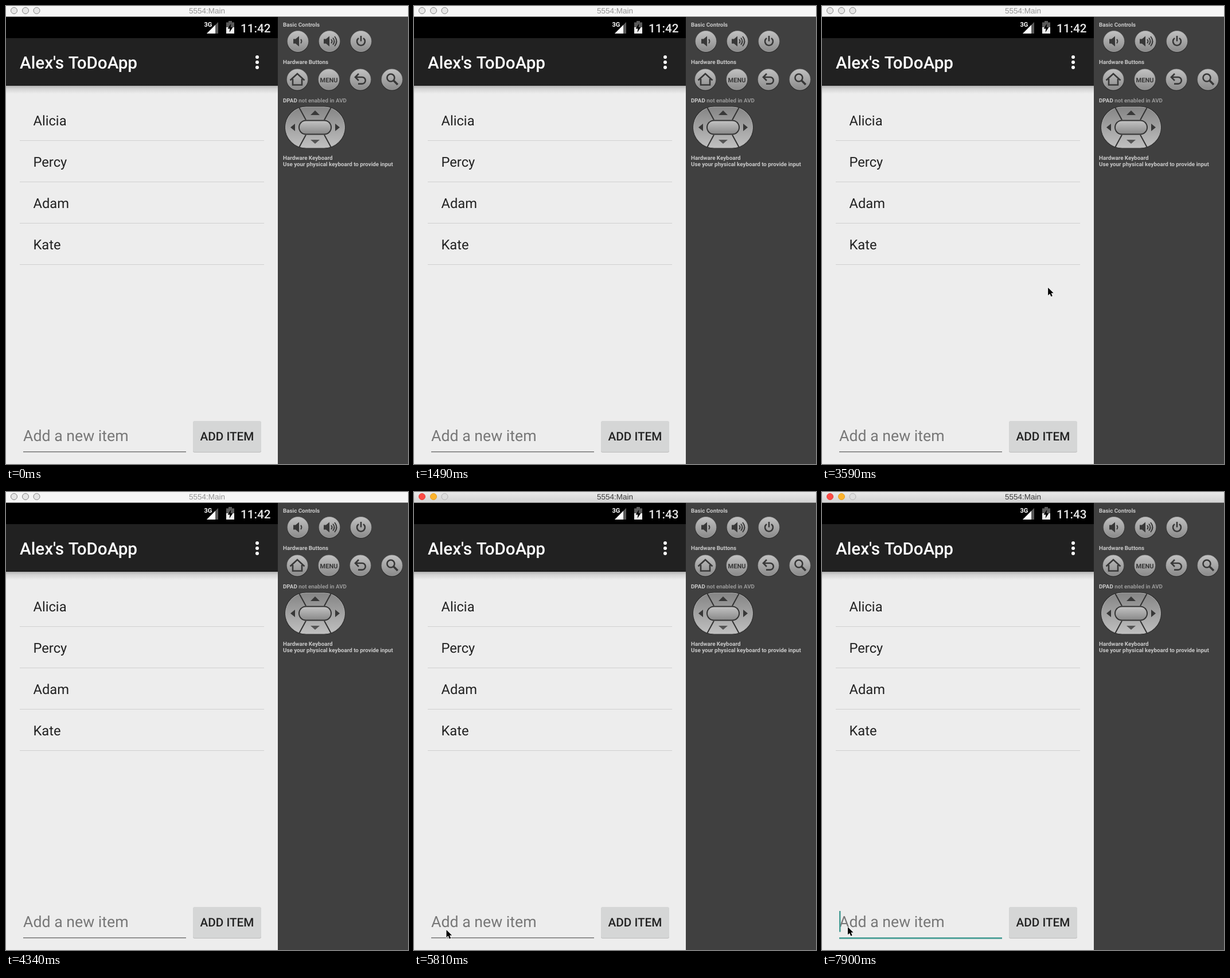
These frames come from a looping animation (701x798 px, 8000 ms). An HTML page:

```html
<!DOCTYPE html>
<html lang="en">
<head>
<meta charset="utf-8">
<title>To-do list in an emulator</title>
<style>
  html, body { margin: 0; width: 100%; height: 100%; overflow: hidden; background: #404040; }
  svg { display: block; width: 100vw; height: 100vh; font-family: Roboto, sans-serif; text-rendering: geometricPrecision; }
  .bar { fill: #f6f6f6; }
  .active .bar { fill: url(#barFill); }
  .name { font: 13.5px "Liberation Sans", sans-serif; fill: #949494; }
  .active .name { fill: #3c3c3c; }
  .light { fill: #e6e6e6; stroke: #858585; }
  .active .light { fill: #dedede; stroke: #b4b4b4; }
  .active .close { fill: #fc4a45; stroke: #e2403b; }
  .active .mini { fill: #fdb32c; stroke: #e09e25; }
  .heading { font-size: 29.6px; font-weight: 500; }
  .item { font-size: 23.7px; fill: #212121; }
  .panel { font-size: 9.8px; font-weight: 700; fill: #c9c9c9; }
  .icon { fill: none; stroke: #383838; stroke-width: 2.6; }
  .solid { fill: #383838; }
</style>
</head>
<body>
<svg id="stage" viewBox="0 0 701 798">
  <defs>
    <linearGradient id="barFill" x2="0" y2="1"><stop stop-color="#eaeaea"/><stop offset="1" stop-color="#d3d3d3"/></linearGradient>
    <linearGradient id="shade" x2="0" y2="1"><stop stop-color="#b2b2b2"/><stop offset=".35" stop-color="#d3d3d3"/><stop offset="1" stop-color="#ededed"/></linearGradient>
    <linearGradient id="metal" x2="0" y2="1"><stop stop-color="#c2c2c2"/><stop offset="1" stop-color="#8a8a8a"/></linearGradient>
    <linearGradient id="pad" x2="0" y2="1"><stop stop-color="#858585"/><stop offset="1" stop-color="#c0c0c0"/></linearGradient>
    <g id="disc">
      <circle cy="1" r="19" fill="#333"/>
      <circle r="18" fill="url(#metal)" stroke="#a8a8a8" stroke-width=".8"/>
    </g>
    <path id="speaker" class="solid" d="M-8-4h4l6-5v18l-6-5h-4z"/>
  </defs>

  <rect width="701" height="798" fill="#404040"/>
  <rect class="bar" width="701" height="18"/>
  <rect y="18" width="701" height="1" fill="#9a9a9a"/>
  <circle class="light close" cx="14" cy="8" r="5.5"/>
  <circle class="light mini" cx="34" cy="8" r="5.5"/>
  <circle class="light" cx="53.5" cy="8" r="5.5"/>
  <text class="name" x="350.5" y="13" text-anchor="middle">5554:Main</text>

  <rect y="19" width="474" height="779" fill="#ededed"/>
  <rect y="139" width="474" height="14" fill="url(#shade)"/>
  <rect y="19" width="474" height="37"/>
  <rect y="56" width="474" height="83" fill="#212121"/>

  <g fill="#fff">
    <text x="345.5" y="35.5" font-size="11" font-weight="700">3G</text>
    <path d="M350 48L370 28V48z" fill="#5a5a5a"/>
    <path d="M350 48L365 33V48z"/>
    <path d="M384 28.5h4V26h6v2.5h4V37h-14z" fill="#5a5a5a"/>
    <path d="M384 37h14V48h-14z" fill="#eee"/>
    <path d="M392.5 30.5l-6 9h4l-1 6.5 6-9h-4z" fill="#000"/>
    <text id="clock" x="409" y="45.5" font-size="20.7" font-weight="500" fill="#e8e8e8"></text>
    <text class="heading" x="24" y="108.5">Alex's</text>
    <text class="heading" x="229" y="108.5" text-anchor="end">ToDoApp</text>
    <circle cx="438" cy="89" r="3"/><circle cx="438" cy="98" r="3"/><circle cx="438" cy="107" r="3"/>
  </g>

  <g id="list"></g>

  <text x="30" y="758" font-size="26.7" fill="#777">Add a new item</text>
  <rect id="line" x="30" y="776" width="284"/>
  <rect id="caret" x="30" y="730" width="2.5" height="36.5" fill="#459c94"/>
  <rect x="326" y="724" width="119" height="54" rx="3" fill="#bcbcbc"/>
  <rect x="326" y="723" width="119" height="54" rx="3" fill="#d5d6d6"/>
  <text x="385.5" y="757" font-size="20.7" font-weight="500" fill="#212121" text-anchor="middle">ADD ITEM</text>

  <g class="panel">
    <text x="483" y="36">Basic Controls</text>
    <text x="483" y="100.5">Hardware Buttons</text>
    <text x="483" y="167.5">DPAD <tspan fill="#999">not enabled in AVD</tspan></text>
    <text x="483" y="267.5">Hardware Keyboard</text>
    <text x="483" y="278.5">Use your physical keyboard to provide input</text>
  </g>

  <g transform="translate(509 61.5)"><use href="#disc"/><use href="#speaker"/><path class="icon" d="M5-3.5q3 3.5 0 7" style="stroke-width:2"/></g>
  <g transform="translate(564 61.5)"><use href="#disc"/><use href="#speaker" x="-2"/><path class="icon" d="M3-3.5q3 3.5 0 7M6-6q5 6 0 12M9-8.5q7 8.5 0 17" style="stroke-width:1.9"/></g>
  <g transform="translate(619 61.5)"><use href="#disc"/><path class="icon" d="M-4-5.5a7 7 0 1 0 8 0M0-9.5V0"/></g>
  <g transform="translate(508 128)"><use href="#disc"/><path class="icon" d="M-12.5 1.5L0-10L12.5 1.5M-8-1V9.500h16V-1"/></g>
  <g transform="translate(563 128)"><use href="#disc"/><text class="solid" y="5" font-size="11" font-weight="700" text-anchor="middle">MENU</text></g>
  <g transform="translate(618 128)"><use href="#disc"/><path class="icon" d="M-7-4H3a5.8 5.8 0 0 1 0 11.6H-4M-3-10L-9-4L-3 2"/></g>
  <g transform="translate(673 128)"><use href="#disc"/><circle class="icon" cx="-2" cy="-3" r="6.5"/><path class="icon" d="M3 2L10 9" style="stroke-width:3.5"/></g>

  <g transform="translate(539 211.5)">
    <rect x="-53" y="-37" width="106" height="74" rx="37" fill="#2c2c2c"/>
    <rect x="-51.5" y="-35.5" width="103" height="71" rx="35.5" fill="url(#pad)" stroke="#b2b2b2"/>
    <path d="M-28-35L-16-13M28-35L16-13M-28 35L-16 13M28 35L16 13" stroke="#333" stroke-width="2"/>
    <rect x="-29" y="-13" width="58" height="26" rx="13" fill="#333"/>
    <rect x="-27" y="-11" width="54" height="22" rx="11" fill="url(#metal)"/>
    <path class="solid" d="M-8-21.5L0-29.5L8-21.5z"/>
    <path d="M-8 21.5L0 28.5L8 21.5z" fill="#555"/>
    <path class="solid" d="M-35-6.5V6.5L-43 0zM35-6.5V6.5L43 0z"/>
  </g>

  <g id="pointer">
    <circle id="ring" cx="1" cy="-2" r="9.5" fill="none" stroke="#111" stroke-width="1.2"/>
    <path d="M0 0V13.3L3.1 10.4L5.3 15.5L7.7 14.4L5.5 9.5H9.6z" stroke="#fff" stroke-width="1.2" paint-order="stroke"/>
  </g>
</svg>
<script>
const $ = id => document.getElementById(id);
const LOOP = 8000, TICK = 147;

$('list').innerHTML = ['Alicia', 'Percy', 'Adam', 'Kate'].map((name, i) =>
  `<text class="item" x="47.5" y="${207.5 + 72 * i}">${name}</text>
   <rect x="24" y="${234 + 72 * i}" width="426" height="1" fill="#d0d0d0"/>`).join('');

// Pointer strokes: visible time, ticks taken, first tick, then a quadratic curve.
const strokes = [
  { from: 750, to: 1490, ticks: 4, first: 0, x: [74, 166, 306], y: [254, 115, -5] },
  { from: 2840, to: 2990, ticks: 1, first: 0, x: [204.5, 204.5, 204.5], y: [-5.5, -5.5, -5.5] },
  { from: 2990, to: 3290, ticks: 1, first: 0, x: [234, 234, 234], y: [286, 286, 286] },
  { from: 3290, to: 4340, ticks: 7, first: 1, x: [234, 441, 554], y: [286, 525, 764] },
  { from: 5210, to: LOOP, ticks: 5, first: -1, x: [72, 60, 45], y: [750, 771, 758] },
];

const within = (t, a, b) => t >= a && t < b;
const curve = ([a, b, c], u) => (1 - u) ** 2 * a + 2 * u * (1 - u) * b + u * u * c;
const show = (id, on) => { $(id).style.display = on ? '' : 'none'; };

function draw() {
  const t = performance.now() % LOOP;
  const focused = t >= 7760;

  $('stage').classList.toggle('active', t >= 5210);
  $('clock').textContent = t < 5210 ? '11:42' : '11:43';

  const stroke = strokes.find(s => within(t, s.from, s.to));
  show('pointer', stroke);
  if (stroke) {
    const tick = stroke.first + Math.floor((t - stroke.from) / TICK);
    const u = Math.max(0, Math.min(1, tick / stroke.ticks));
    $('pointer').setAttribute('transform', `translate(${curve(stroke.x, u)} ${curve(stroke.y, u)})`);
  }
  show('ring', within(t, 5210, 5360) || within(t, 6410, 6560));
  show('caret', within(t, 7310, 7760) || t >= 7900);

  $('line').setAttribute('height', focused ? 2.7 : 1.5);
  $('line').setAttribute('fill', focused ? '#459c94' : '#757575');
  requestAnimationFrame(draw);
}
draw();
</script>
</body>
</html>
```
